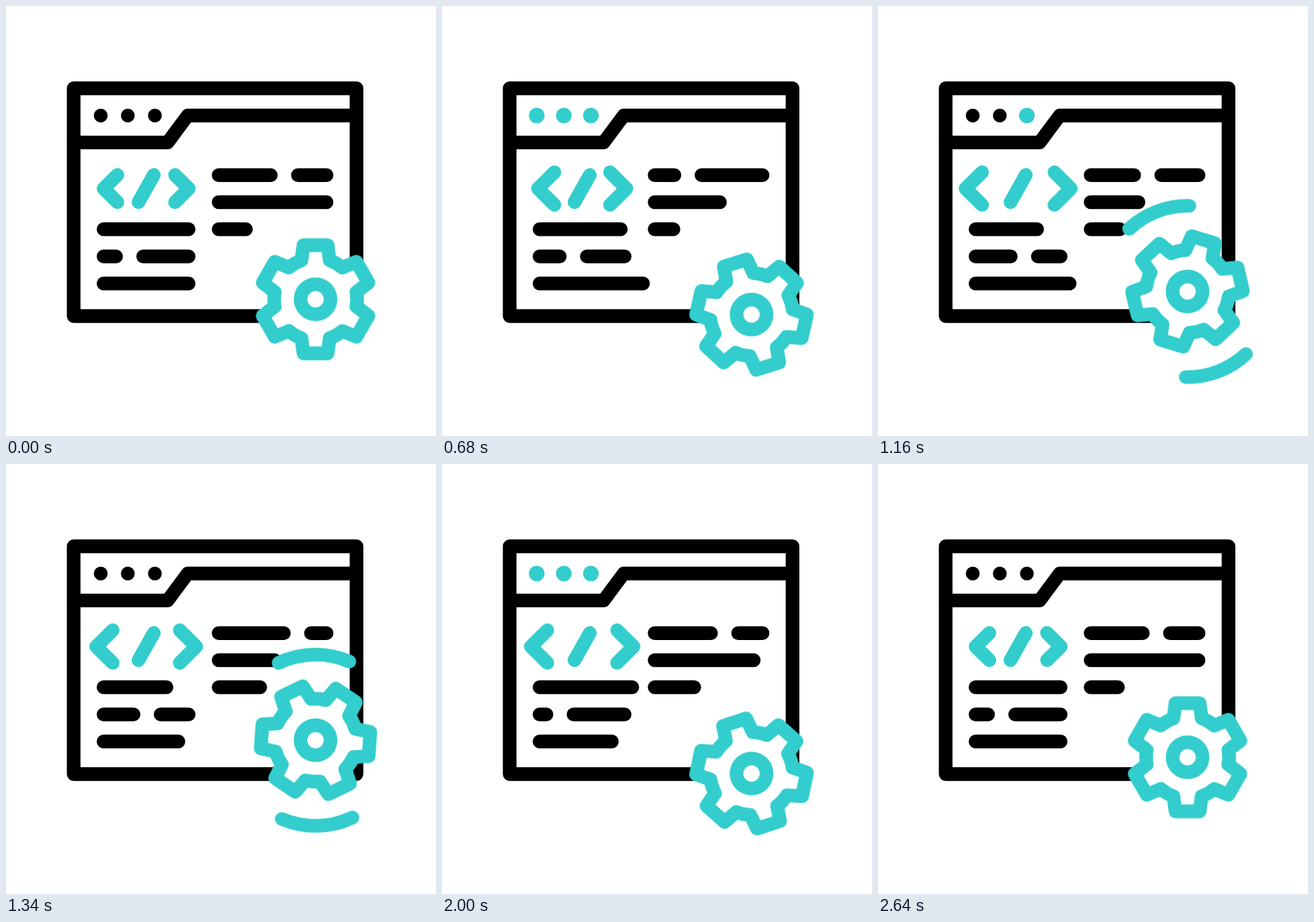
An HTML page without scripts that plays this animation: 640 by 640 pixels, repeating every 3 s.

```html
<!DOCTYPE html>
<html lang="en">
<head>
<meta charset="utf-8">
<title>Code window and gear</title>
<style>
@property --w { syntax: "<length>"; inherits: true; initial-value: 0px; }

:root {
  --teal: #33cdcd;
  --ease: cubic-bezier(.333, 0, .667, 1);
}
html, body { margin: 0; width: 100%; height: 100%; overflow: hidden; background: #fff; }
svg { display: block; width: 100vw; height: 100vh; }

.ink, .accent {
  fill: none; stroke-width: 20.3; stroke-linecap: round; stroke-linejoin: round;
}
.ink { stroke: #000; }
.accent { stroke: var(--teal); }
.solid { fill: #fff; }

/* header dots */
.dots circle { r: 10.3px; animation: dot 3s linear infinite; }
.dots :nth-child(2) { animation-delay: .15s; }
.dots :nth-child(3) { animation-delay: .3s; }
@keyframes dot {
  0%, 10%, 32%, 50%, 72.7%, 100% { r: 10.3px; fill: #000; }
  12.7%, 29.3%, 52.7%, 70% { r: 11.6px; fill: var(--teal); }
}

/* brackets */
.bracket {
  transform-box: fill-box; transform-origin: center;
  animation: 3s var(--ease) infinite;
}
.bracket path { vector-effect: non-scaling-stroke; }
.left { animation-name: left; }
.right { animation-name: right; }
@keyframes left {
  0%, 6.5%, 88%, 100% { transform: none; }
  22.5%, 54.7% { transform: translateX(-.5px) scale(1.2); }
  38.7%, 70.7% { transform: translateX(-13px) scale(1.2); }
}
@keyframes right {
  0%, 6.5%, 88%, 100% { transform: none; }
  22.5%, 54.7% { transform: translateX(.5px) scale(1.2); }
  38.7%, 70.7% { transform: translateX(13px) scale(1.2); }
}

/* text bars: --w is the length of the first bar in a row */
.row { animation: 3s var(--ease) infinite; }
.row rect { height: 20.5px; rx: 10.25px; width: var(--w); }
.row .rest {
  x: calc(var(--w) + 20px);
  width: calc(var(--full) - 20px - var(--w));
}
.a { --full: 181px; animation-name: a; }
.b { animation-name: b; }
.c { animation-name: c; }
.d { animation-name: d; }
.e { --full: 147px; animation-name: e; }
.f { animation-name: f; }
@keyframes a {
  0%, 6.3%, 73.3%, 100% { --w: 98px; }
  27.7% { --w: 42px; }
  50% { --w: 130px; }
}
@keyframes b {
  0%, 6.3%, 77.1%, 100% { --w: 181px; }
  32.8% { --w: 87px; }
}
@keyframes c {
  0%, 6.3%, 74.7%, 100% { --w: 61px; }
  28.3% { --w: 46px; }
  56.7% { --w: 105px; }
}
@keyframes d {
  0%, 16.5%, 83.3%, 100% { --w: 147px; }
  41.2% { --w: 111px; }
  64.1% { --w: 159px; }
}
@keyframes e {
  0%, 13.3%, 83.3%, 100% { --w: 39px; }
  37.5% { --w: 73px; }
  63.6% { --w: 30px; }
}
@keyframes f {
  0%, 15%, 74.7%, 100% { --w: 147px; }
  28% { --w: 190px; }
  56.1% { --w: 99px; }
}

/* gear */
.bob { animation: bob 3s var(--ease) infinite; }
@keyframes bob {
  0%, 6.3%, 88%, 100% { transform: translate(460.7px, 436.5px); }
  26.2%, 64.5% { transform: translate(460.7px, 461.3px); }
  45.3% { transform: translate(460.7px, 411px); }
}
.spin { animation: spin 3s linear infinite; }
@keyframes spin {
  0% { transform: rotate(0deg); }
  6.333% { transform: rotate(0deg); animation-timing-function: cubic-bezier(.333, 0, .667, .307); }
  22.667% { transform: rotate(42.4deg); animation-timing-function: cubic-bezier(.333, .27, .667, .655); }
  32.667% { transform: rotate(109deg); animation-timing-function: cubic-bezier(.333, .613, .667, .707); }
  44.667% { transform: rotate(154deg); animation-timing-function: cubic-bezier(.333, .19, .667, .636); }
  53.333% { transform: rotate(204deg); animation-timing-function: cubic-bezier(.333, .361, .667, .708); }
  66.667% { transform: rotate(281.5deg); animation-timing-function: cubic-bezier(.333, .462, .667, 1); }
  88%, 100% { transform: rotate(360deg); }
}
.trail { visibility: hidden; animation: trail 3s linear infinite; }
@keyframes trail {
  0%, 28.6% { visibility: hidden; stroke-dasharray: 0 999; stroke-dashoffset: 0; }
  28.7% { visibility: visible; stroke-dasharray: 1 999; stroke-dashoffset: 0; }
  32.667% { stroke-dasharray: 29 999; }
  36% { stroke-dasharray: 42 999; }
  44.667% { visibility: visible; stroke-dasharray: 49 999; stroke-dashoffset: 0; }
  52% { visibility: visible; stroke-dasharray: 4 999; stroke-dashoffset: -78; }
  52.1%, 100% { visibility: hidden; stroke-dasharray: 0 999; stroke-dashoffset: -82; }
}
</style>
</head>
<body>
<svg viewBox="0 0 640 640">
  <defs>
    <path id="tooth" d="M-21-58L-18-80.5H18L21-58A61.7 61.7 0 0 1 39.7-47.2"/>
    <path id="half" pathLength="180" d="M0-127.5A127.5 127.5 0 0 1 0 127.5"/>
  </defs>

  <g class="ink">
    <rect x="100.7" y="122.5" width="421" height="339"/>
    <path d="M101 203.2H240.5L270.5 163H521"/>
  </g>

  <g class="dots">
    <circle cx="141" cy="163"/>
    <circle cx="181.3" cy="163"/>
    <circle cx="221.6" cy="163"/>
  </g>

  <g class="accent">
    <g class="bracket left"><path d="M165.8 251.5L145.3 271.7L165.8 292"/></g>
    <path d="M197.2 292L220 251.5"/>
    <g class="bracket right"><path d="M251.6 251.5L272 271.7L251.6 292"/></g>
  </g>

  <g transform="translate(306.3 241.5)">
    <g class="row a"><rect/><rect class="rest"/></g>
    <g class="row b"><rect y="40.3"/></g>
    <g class="row c"><rect y="80.5"/></g>
  </g>
  <g transform="translate(135 322)">
    <g class="row d"><rect/></g>
    <g class="row e"><rect y="40.5"/><rect class="rest" y="40.5"/></g>
    <g class="row f"><rect y="80.7"/></g>
  </g>

  <g class="bob">
    <g class="spin accent">
      <use href="#half" class="trail"/>
      <use href="#half" class="trail" transform="rotate(180)"/>
      <circle r="60" class="solid" stroke="none"/>
      <g class="solid">
        <use href="#tooth"/>
        <use href="#tooth" transform="rotate(60)"/>
        <use href="#tooth" transform="rotate(120)"/>
        <use href="#tooth" transform="rotate(180)"/>
        <use href="#tooth" transform="rotate(240)"/>
        <use href="#tooth" transform="rotate(300)"/>
      </g>
      <circle r="22.3" class="solid"/>
    </g>
  </g>
</svg>
</body>
</html>
```
